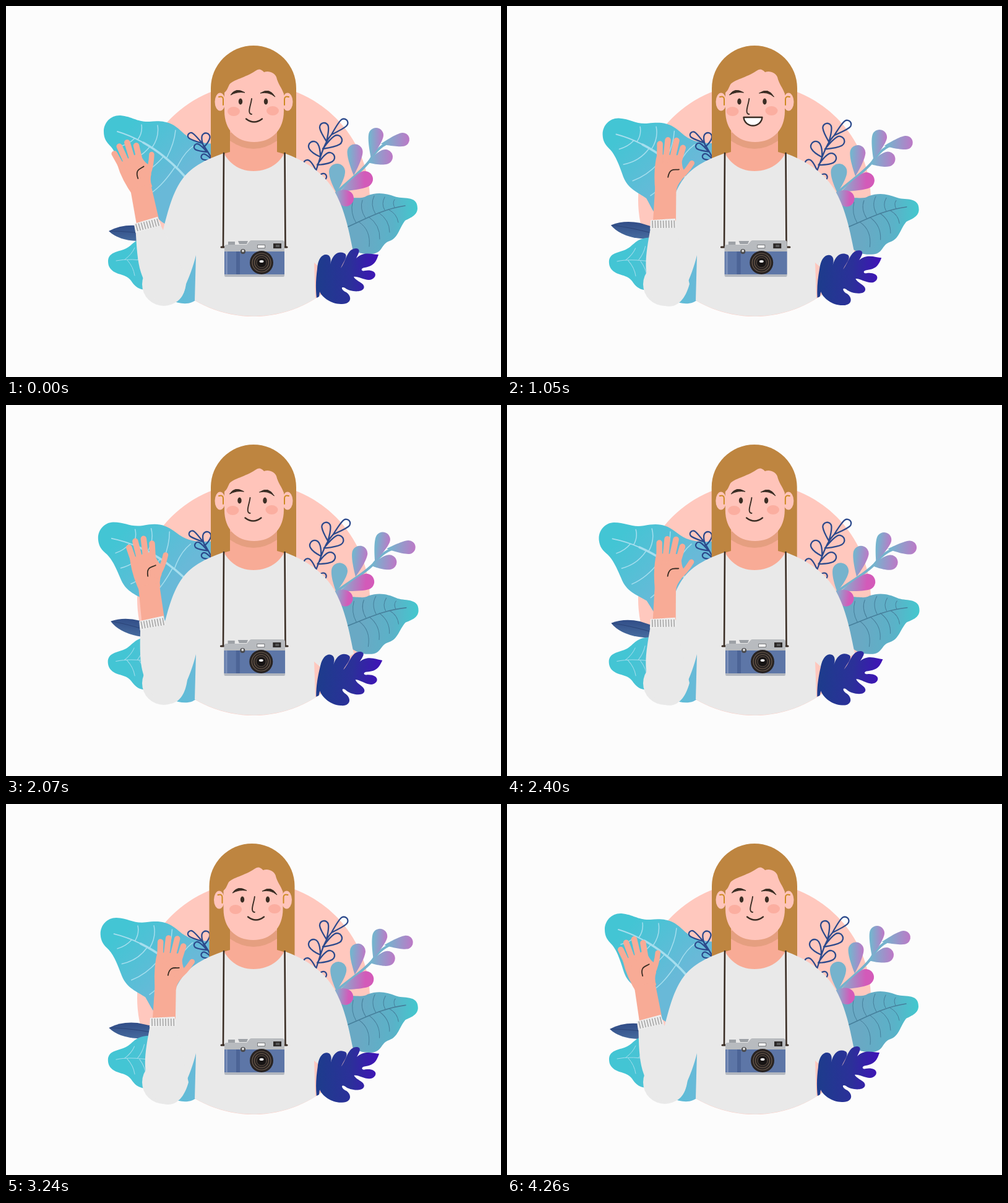
An HTML page that plays this animation: 800x600 px, repeating every 4.29 s.

```html
<!DOCTYPE html>
<html lang="en">
<head>
<meta charset="utf-8">
<title>Waving photographer</title>
<style>
html, body { margin: 0; width: 100%; height: 100%; overflow: hidden; background: #fcfcfc; }
svg { display: block; width: 800px; height: 600px; }
.line { fill: none; stroke-linecap: round; stroke-linejoin: round; }
.ink { stroke: #3a2d24; }
</style>
</head>
<body>
<svg viewBox="0 0 800 600">
  <defs>
    <linearGradient id="teal" x1="0" y1="0" x2=".8" y2=".8">
      <stop offset=".2" stop-color="#43c5d4"/><stop offset=".75" stop-color="#69b9d8"/>
    </linearGradient>
    <linearGradient id="tealLow">
      <stop offset=".2" stop-color="#43c5d4"/><stop offset="1" stop-color="#69b9d8"/>
    </linearGradient>
    <linearGradient id="tealRight">
      <stop offset=".3" stop-color="#69a9c4"/><stop offset=".7" stop-color="#5ab2c8"/><stop offset="1" stop-color="#43c8ce"/>
    </linearGradient>
    <linearGradient id="violet">
      <stop offset=".1" stop-color="#75b4ce"/><stop offset="1" stop-color="#bd78c6"/>
    </linearGradient>
    <linearGradient id="magenta">
      <stop offset=".1" stop-color="#8aa9cc"/><stop offset=".75" stop-color="#d35ab9"/>
    </linearGradient>
    <linearGradient id="indigo">
      <stop offset="0" stop-color="#1d3c8c"/><stop offset=".55" stop-color="#2b3099"/><stop offset="1" stop-color="#4012b8"/>
    </linearGradient>
    <linearGradient id="navy" x2=".3" y2="1">
      <stop offset="0" stop-color="#2f4a85"/><stop offset="1" stop-color="#44689c"/>
    </linearGradient>
  </defs>

  <circle cx="400" cy="314" r="188" fill="#ffc8be"/>

  <g id="darkLeaf">
    <path fill="url(#navy)" d="M166,364Q186,353 212,355L250,362V380H212Q182,379 166,364Z"/>
    <path class="line" stroke="#2b4478" d="M168,364Q200,364 245,371"/>
  </g>
  <g id="lowLeaf">
    <path fill="url(#tealLow)" d="M165,412C166,398 180,398 192,393C205,388 208,374 232,374L310,380V472C300,485 280,482 268,476L240,456C222,462 212,458 204,447C196,433 182,436 172,428C166,423 165,418 165,412Z"/>
    <path class="line" stroke="#a4dcec" d="M178,412Q200,407 240,414M192,410Q203,402 208,391M213,410Q221,400 224,388M196,411Q206,422 208,436M216,412Q225,424 227,440"/>
  </g>
  <g id="bigLeaf">
    <path fill="url(#teal)" d="M158,203C158,188 170,176 185,177C205,179 212,188 232,187C262,184 272,192 285,204C300,219 318,223 345,223L330,330L262,355C240,345 234,325 225,308C212,298 196,292 189,272C182,250 178,238 170,228C162,220 158,214 158,203Z"/>
    <g class="line" stroke="#a6deee">
      <path stroke-width="2" d="M180,203Q240,221 292,279"/>
      <path stroke-width="3.5" d="M222,221Q260,242 293,280"/>
      <path stroke-width="1.5" d="M213,216Q221,205 219,192M236,229Q248,212 245,193M260,245Q272,222 274,201M277,260Q288,236 306,224M208,214Q198,224 184,227M232,228Q216,248 190,252M255,243Q232,270 204,279M274,259Q252,292 232,304"/>
    </g>
  </g>
  <g id="leftSprig" class="line" stroke="#2c4a8c" stroke-width="2.3"></g>
  <g id="rightSprig" class="line" stroke="#2c4a8c" stroke-width="2.3"></g>
  <g id="rightLeaf">
    <path fill="url(#tealRight)" d="M535,312C565,308 575,313 583,307C600,300 615,303 628,308C640,313 665,305 665,327C665,338 655,342 645,347C635,360 634,375 620,380C605,385 610,400 590,401C575,402 563,398 550,385Z"/>
    <g class="line" stroke="#467f9b">
      <path stroke-width="1.6" d="M645,323C610,328 580,345 548,359"/>
      <path d="M566,351Q556,335 560,317M581,343Q571,328 576,314M597,336Q588,321 595,307M612,330Q606,320 612,309M628,326Q624,318 628,313M570,349Q590,362 587,389M586,341Q605,354 604,377M602,334Q620,346 620,366M618,329Q632,336 634,350"/>
    </g>
  </g>
  <g id="budSprig"><path class="line" stroke="#74b2cd" stroke-width="4" d="M532,304C550,285 575,268 588,250C595,238 605,224 622,220"/></g>

  <g id="head">
    <path fill="#be8540" d="M331,252V133A69,69 0 0 1 469,133V252Z"/>
  </g>
  <path fill="#f8ab96" d="M362,180H438V236L452,240V275H348V240L362,236Z"/>
  <path fill="#e59f80" d="M362,205H438V218Q400,244 362,218Z"/>
  <g id="face">
    <g fill="#ffc4ba">
      <ellipse cx="346" cy="155" rx="8.5" ry="14.5"/><ellipse cx="455" cy="155" rx="8.5" ry="14.5"/>
      <path d="M353,170V140C357,137 358,133 361,127C367,119 387,116 403,105Q410,99 417,107C425,104 434,108 437,115C440,127 445,131 449,142V170C449,200 430,220 401,220C372,220 353,200 353,170Z"/>
    </g>
    <path class="line" stroke="#cd8a22" stroke-width="2" d="M344,147Q351,145 351,151V160M457,147Q450,145 450,151V160"/>
  </g>
  <g id="features">
    <g fill="#fbaea0"><ellipse cx="368" cy="170.500" rx="10" ry="7.500"/><ellipse cx="431" cy="169.500" rx="10" ry="7.500"/></g>
    <path fill="#3a2d24" d="M363,144Q371,131 386,140Q373,138 363,144ZM411,141Q426,131 435,147Q425,138 411,141Z" stroke="#3a2d24" stroke-linejoin="round"/>
    <g fill="#3a2d24"><ellipse class="eye" cx="379" rx="3.2"/><ellipse class="eye" cx="420" rx="3.2"/></g>
    <path id="mouth" class="ink" fill="#fff" stroke-width="2.3" stroke-linecap="round" stroke-linejoin="round"/>
  </g>
  <path id="nose" class="line ink" stroke-width="1.9" d="M397,150C396,160 389,174 397,175"/>

  <g fill="#e9e9e9">
    <path d="M352,238C320,249 298,262 285,280C270,300 262,330 254,362L240,430C245,480 275,482 285,462C296,440 303,420 307,403L305,476A188,188 0 0 0 500,473L498,415L515,430L562,402C552,350 545,325 530,298C515,275 495,255 450,238C440,258 420,267 400,267C380,267 362,257 352,238Z"/>
    <circle cx="255" cy="450" r="35"/>
  </g>
  <g id="forearm">
    <g id="hand" fill="#f8ab96" stroke="#f8ab96">
      <path stroke="none" d="M241,300Q238,265 245,240L285,242Q284,260 288,266L284,282Q276,290 275,300Z"/>
      <path class="line" stroke-width="9.500" d="M249,255L250,223M259,250L263,217M269,250L277,218M279,255L287,230"/>
      <path class="line" stroke-width="8.500" d="M276,282Q290,272 301,255"/>
      <path class="line ink" stroke-width="1.8" d="M262,277C265,261 274,266 280,265"/>
    </g>
    <path fill="#f8ab96" d="M237,348L241,290H275L274,348Z"/>
    <path fill="#e9e9e9" d="M233,358C228,385 224,405 225,425C228,460 238,486 262,486C280,486 290,468 295,450L274,357Z"/>
    <path fill="#eee" d="M233,346L273,344L275,359L232,361Z"/>
    <path id="ribs" stroke="#a9a9a9" stroke-width="1.7"/>
  </g>

  <path class="line ink" stroke-width="2.6" d="M352,238L351,389M450.500,238L451.500,389"/>
  <g id="cameraBody">
    <path class="line ink" stroke-width="3" d="M348,390H356M448,390H454"/>
    <path fill="#b8bbbf" d="M353,397V390Q353,386 357,386H389L394,380Q395,379 397,379H446Q450,379 450,383V397Z"/>
    <path fill="#9da1a6" d="M359,381H370V386H359ZM375,380H391L389,385H377Z"/>
    <path fill="#5d76a7" d="M353,397H450V434H353Z"/>
    <path fill="#4c6496" d="M372,397H378V434H372Z"/>
    <path fill="#b3b7bf" d="M353,434H450V436Q450,438 448,438H355Q353,438 353,436Z"/>
    <path fill="#7b90ba" d="M355,397H358V434H355Z"/>
  </g>
  <g id="cameraParts">
    <rect x="406.500" y="386.500" width="12" height="5" fill="#fff" stroke="#77797c"/>
    <rect x="432" y="384" width="13" height="8" fill="#2d2a29"/><rect x="436" y="386" width="6" height="4" fill="#555"/>
    <circle cx="383" cy="397" r="4" fill="#4a4a4c"/><circle cx="383" cy="396" r="2" fill="#ddd"/>
    <circle cx="413" cy="415" r="19" fill="#282322"/>
    <circle cx="413" cy="415" r="15" fill="none" stroke="#6d5c4d" stroke-width="1.2"/>
    <circle cx="413" cy="415" r="11.500" fill="none" stroke="#6d5c4d" stroke-width="1.2"/>
    <circle cx="413" cy="415" r="8" fill="#171414" stroke="#5c4e43"/>
    <ellipse cx="413" cy="413" rx="3.500" ry="2" fill="#eee"/>
  </g>

  <path id="monstera" fill="url(#indigo)" d="M502,472C500,455 501,440 503,425C504,410 510,402 517,402C524,402 526,409 524,418C528,400 538,396 547,400C554,404 545,414 541,424C550,412 551,392 566,392C574,393 570,400 566,408C578,396 592,402 602,402C598,414 595,420 580,423C572,424 574,430 580,428C590,426 600,430 596,438C588,450 570,436 562,438C566,446 582,448 578,457C574,464 555,462 548,456C540,452 542,460 550,463C560,470 558,482 543,482C525,483 510,470 507,462L506,470Z"/>
</svg>
<script>
const LOOP = 4290, WAVE = 215.5;
const $ = id => document.getElementById(id);
const ease = x => (1 - Math.cos(Math.PI * Math.min(1, Math.max(0, x)))) / 2;
const move = (id, value) => $(id).setAttribute('transform', value);

// Teardrop: a circle drawn out to a point
function drop(cx, cy, r, tx, ty) {
  const d = Math.hypot(tx - cx, ty - cy), ux = (tx - cx) / d, uy = (ty - cy) / d;
  const at = (along, side) => `${cx + r * (ux * along - uy * side)},${cy + r * (uy * along + ux * side)}`;
  return `M${tx},${ty}C${tx},${ty} ${at(1, 1)} ${at(0, 1)}A${r},${r} 0 0 1 ${at(0, -1)}C${at(1, -1)} ${tx},${ty} ${tx},${ty}Z`;
}
const addPath = (id, d, fill) => $(id).insertAdjacentHTML('beforeend', `<path d="${d}" fill="${fill}"/>`);
const sprig = (id, stem, drops) => addPath(id, stem + drops.map(a => drop(...a)).join(''), 'none');

sprig('leftSprig', 'M338,256C330,242 324,232 317,222',
  [[299, 210, 5, 317, 222], [323, 212, 6.5, 320, 228], [309, 228, 5, 325, 236], [320, 244, 4.5, 333, 249]]);
sprig('rightSprig', 'M498,275C508,248 512,222 528,206',
  [[546, 189, 6.5, 526, 208], [514, 196, 7, 518, 219], [535, 217, 8, 512, 231], [497, 227, 8, 508, 244],
   [523, 245, 8, 503, 257], [487, 255, 6, 501, 266], [513, 276, 5, 500, 280]]);
[[598, 209, 12, 590, 246], [641, 216, 11, 606, 223], [613, 244, 12, 584, 253], [564, 236, 12.5, 562, 274],
 [535, 268, 13, 534, 302]].forEach((a, i) => addPath('budSprig', drop(...a), i == 4 ? '#76b3cd' : 'url(#violet)'));
[[580, 280, 13, 540, 300], [549, 311, 13, 532, 302]].forEach(a => addPath('budSprig', drop(...a), 'url(#magenta)'));

$('ribs').setAttribute('d', Array.from({ length: 9 }, (_, i) => `M${236 + i * 4.4},347l.3,12`).join(''));

function track(t, keys) {
  let i = keys.findIndex(k => k[0] > t);
  if (i < 0) return keys.at(-1)[1];
  if (!i) return keys[0][1];
  const [t0, a] = keys[i - 1], [t1, b] = keys[i];
  return a + (b - a) * ease((t - t0) / (t1 - t0));
}
const sway = (t, peak, end = 4230) => track(t, [[180, 0], [peak, 1], [end, 0]]);

function draw(now) {
  const t = now % LOOP;
  const turn = (id, angle, x, y) => move(id, `rotate(${angle} ${x} ${y})`);
  turn('bigLeaf', -5.7 * sway(t, 2350), 310, 305);
  turn('lowLeaf', -1.2 * sway(t, 2200), 300, 430);
  turn('darkLeaf', 10.8 * sway(t, 1700, 3700), 250, 375);
  turn('rightLeaf', 3.1 * sway(t, 2200), 555, 360);
  turn('budSprig', 7.5 * sway(t, 2350), 535, 300);
  turn('monstera', 6.3 * sway(t, 1950, 3700), 505, 465);
  const twig = track(t, [[420, 0], [1050, 1], [2450, 1], [3240, 0]]);
  turn('rightSprig', 2.7 * twig, 500, 268);
  turn('leftSprig', 2.5 * twig, 335, 252);

  const back = (1 + Math.cos(Math.PI * t / WAVE)) / 2;
  move('forearm', `translate(${-3 * back} ${-2 * back}) rotate(${-14 * back} 255 445)`);
  turn('hand', -17 * back, 258, 293);

  const hair = track(t, [[0, 0], [390, 2], [600, 2], [1080, 0], [2190, 0], [3150, -2.5], [3300, -2.5], [3780, 0]]);
  const look = track(t, [[0, 0], [390, -10], [600, -10], [1080, -3.5], [1620, -2], [2190, -1.5], [3150, 3], [3300, 3], [3780, 0]]);
  move('head', `translate(${hair})`);
  move('face', `translate(${hair * .6})`);
  move('features', `translate(${look})`);
  move('nose', `translate(${look * 1.6})`);

  const shut = track(t, [[1620, 0], [1710, 1], [1740, 1], [1830, 0]]);
  for (const eye of document.querySelectorAll('.eye')) {
    eye.setAttribute('cy', 154.5 + 3 * shut);
    eye.setAttribute('ry', 5 - 4.2 * shut);
    eye.setAttribute('rx', 3.2 - shut);
  }
  const open = track(t, [[120, 0], [330, 1], [1260, 1], [1500, 0]]);
  const y = 182.5 - 2.5 * open, l = 388 - 2 * open, r = 414 + 2 * open;
  const inset = 9 - 7 * open, top = y + 7 * (1 - open), low = y + 7 + 11 * open;
  $('mouth').setAttribute('d', `M${l},${y}C${l + inset},${top} ${r - inset},${top} ${r},${y}C${r - inset},${low} ${l + inset},${low} ${l},${y}Z`);

  const swing = track(t, [[0, 0], [400, 1], [1050, .7], [1710, .6], [2400, 0]]);
  move('cameraBody', `translate(${353 - 2 * swing}) scale(${1 + .06 * swing} 1) translate(-353)`);
  move('cameraParts', `translate(${-2.5 * swing})`);
  requestAnimationFrame(draw);
}
requestAnimationFrame(draw);
</script>
</body>
</html>
```
